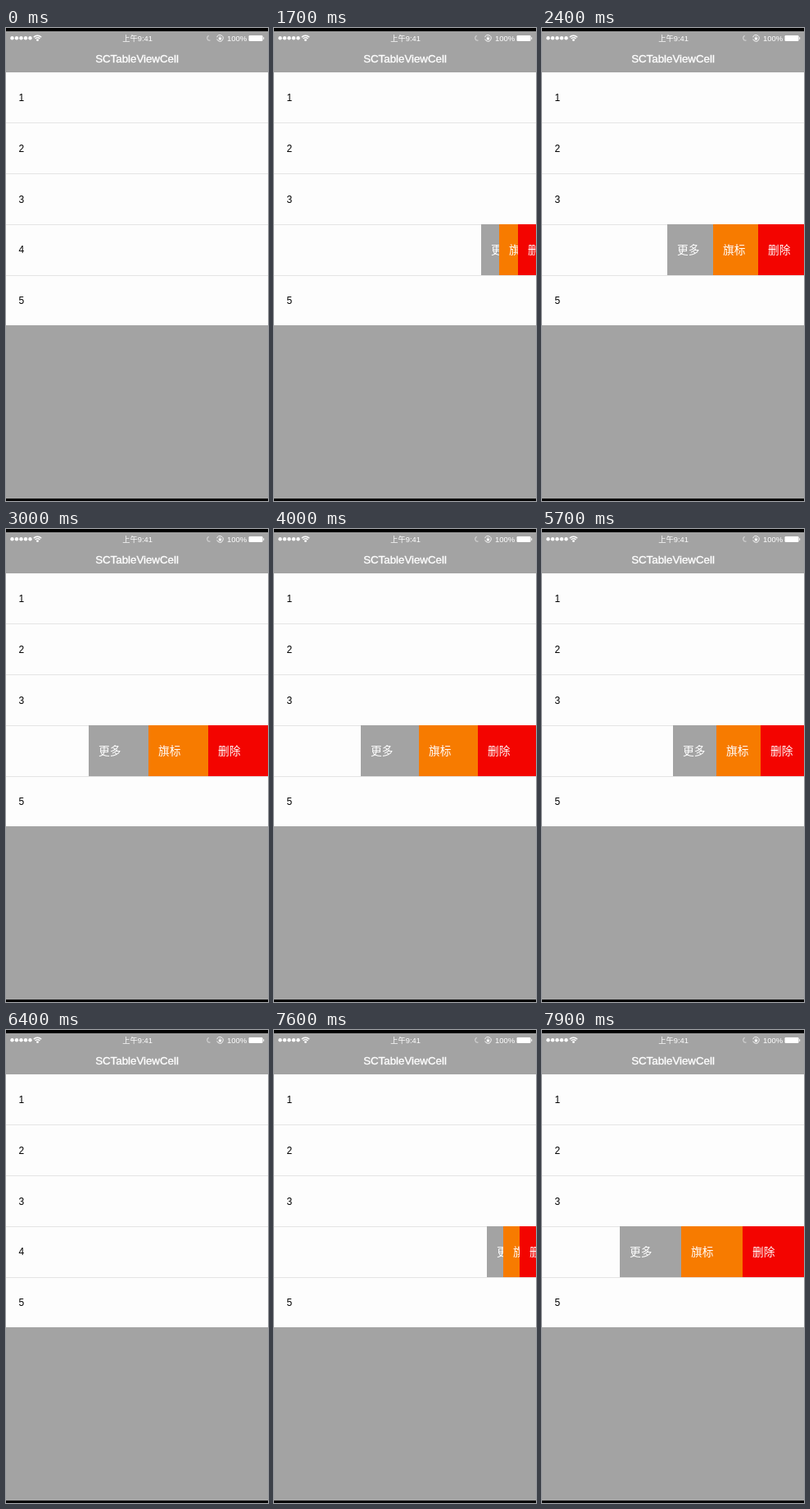
Write an HTML page with a canvas that moves like this. It is 320x576 px and loops after 8000 ms.

```html
<!DOCTYPE html>
<html lang="zh">
<head>
<meta charset="utf-8">
<title>SCTableViewCell</title>
<style>
  html, body { margin: 0; width: 100%; height: 100%; overflow: hidden; background: #000; }
  canvas { display: block; }
</style>
</head>
<body>
<canvas id="stage" width="320" height="576"></canvas>
<script>
const ctx = document.getElementById('stage').getContext('2d');
const LOOP = 8000, STEP = 100;
const GRAY = '#a3a3a3', WHITE = '#fdfdfd';
const ROW_TOP = 54, ROW_HEIGHT = 61.75;
const FONT = '"Liberation Sans", "Noto Sans CJK SC", "Noto Sans CJK", sans-serif';
const CJK = '"Noto Sans CJK SC", "Noto Sans CJK", sans-serif';
const BUTTONS = [['更多', GRAY], ['旗标', '#f77b00'], ['删除', '#f30400']];

// [time, revealed width]: drag open, settle, close, drag open again
const SWIPE = [
  [0, 0], [1100, 0], [1200, 12], [1700, 67], [2400, 167], [2900, 215],
  [3000, 219], [3600, 223], [3900, 223], [4000, 214], [4100, 194],
  [4200, 177], [4300, 166], [4400, 161], [4700, 160], [5800, 160],
  [5900, 150], [6000, 122], [6100, 82], [6200, 36], [6300, 0],
  [7400, 0], [7500, 11], [7600, 60], [7800, 185], [7900, 225]
];

function revealedWidth(time) {
  const next = SWIPE.findIndex(([t]) => t >= time);
  if (next <= 0) return SWIPE[0][1];
  const [t0, w0] = SWIPE[next - 1], [t1, w1] = SWIPE[next];
  return w0 + (w1 - w0) * (time - t0) / (t1 - t0);
}

function rect(x, y, w, h, color) {
  ctx.fillStyle = color;
  ctx.fillRect(x, y, w, h);
}

function text(label, x, y, font, color, align = 'left') {
  ctx.font = font;
  ctx.textAlign = align;
  ctx.fillStyle = color;
  ctx.fillText(label, x, y);
}

function disc(x, y, r) {
  ctx.beginPath();
  ctx.arc(x, y, r, 0, Math.PI * 2);
  ctx.fill();
}

function arc(x, y, r, from, to) {
  ctx.beginPath();
  ctx.arc(x, y, r, from, to);
  ctx.stroke();
}

function drawStatusBar() {
  ctx.fillStyle = ctx.strokeStyle = '#fff';
  for (let i = 0; i < 5; i++) disc(7.5 + i * 5.5, 12.2, 2.2);

  ctx.lineWidth = 1.5;
  for (const r of [3.9, 6.4]) arc(38.5, 15.7, r, -Math.PI * 0.76, -Math.PI * 0.24);
  disc(38.5, 14.7, 1.4);

  text('上午9:41', 160.5, 15.7, `9.3px ${FONT}`, '#fff', 'center');

  ctx.strokeStyle = '#d2d2d2';
  ctx.lineWidth = 1.2;
  arc(248.6, 12.2, 2.9, Math.PI * 0.4, Math.PI * 1.4);

  ctx.strokeStyle = '#fff';
  ctx.lineWidth = 0.9;
  arc(261.3, 12.4, 3.8, -Math.PI * 0.9, Math.PI * 0.9);
  rect(259.8, 12, 3.2, 2.4, '#fff');
  arc(261.4, 11.8, 1.1, Math.PI, 0);

  text('100%', 270, 15.8, `9.5px ${FONT}`, '#fff');
  ctx.beginPath();
  ctx.roundRect(296.5, 9, 17, 7, 1.2);
  ctx.fill();
  rect(314.2, 11.2, 1, 2.6, '#fff');
}

function drawTitle() {
  text('SCTableViewCell', 160, 41.7, `13.3px ${FONT}`, '#fff', 'center');
  ctx.strokeStyle = '#fff';
  ctx.lineWidth = 0.35;
  ctx.strokeText('SCTableViewCell', 160, 41.7);
}

function drawRows(width) {
  rect(0, ROW_TOP, 320, 308, WHITE);
  for (let i = 0; i < 5; i++) {
    const top = ROW_TOP + i * ROW_HEIGHT;
    text(String(i + 1), 15.5 - (i === 3 ? width : 0), top + 35, `12px ${FONT}`, '#000');
    if (i < 4) rect(0, Math.floor(top + ROW_HEIGHT), 320, 1, '#e4e4e4');
  }
}

function drawButtons(width) {
  BUTTONS.forEach(([label, color], i) => {
    const x = Math.round(320 - width + i * width / 3);
    rect(x, 239, 320 - x, 62, color);
    text(label, x + 12, 275, `300 13.7px ${CJK}`, '#fff');
  });
}

function draw(now) {
  const time = Math.floor(now % LOOP / STEP) * STEP;
  const width = revealedWidth(time);
  rect(0, 0, 320, 576, '#000');
  rect(0, 4, 320, 569, GRAY);
  drawStatusBar();
  drawTitle();
  drawRows(width);
  if (width > 0) drawButtons(width);
}

function tick() {
  draw(performance.now());
  requestAnimationFrame(tick);
}
tick();
</script>
</body>
</html>
```
